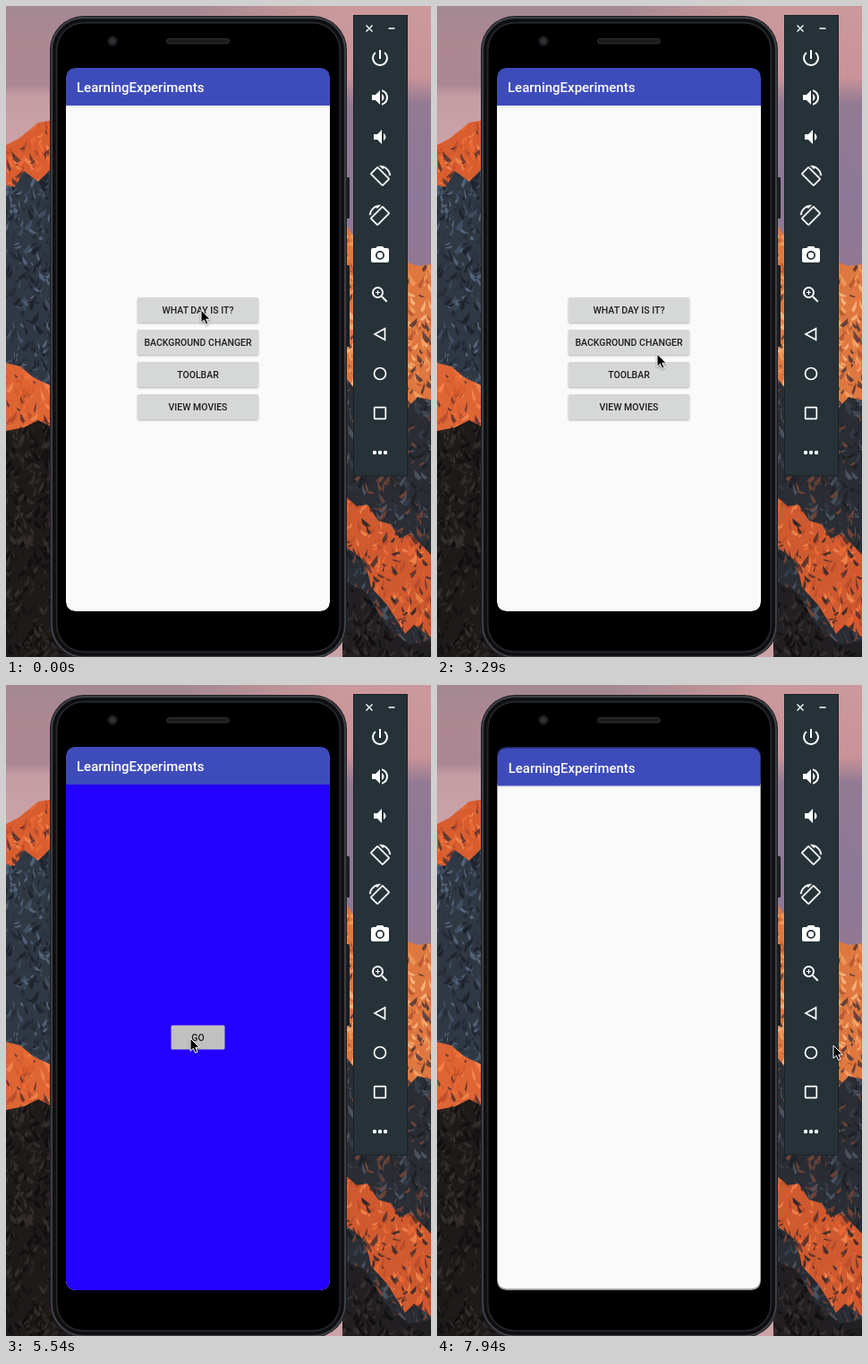
An HTML page for the animation above (8000 ms loop, 475x726 px).

```html
<!DOCTYPE html>
<html lang="en">
<head>
<meta charset="utf-8">
<title>Phone emulator</title>
<style>
html, body { margin: 0; width: 100%; height: 100%; overflow: hidden; background: #000; }
svg { display: block; width: 475px; height: 726px; font-family: Roboto, sans-serif; }
.title { font: 500 15px Roboto, sans-serif; fill: #fff; }
.label { font: 500 10.5px Roboto, sans-serif; fill: #1d1d1d; text-anchor: middle; }
.body { font: 400 19.5px Roboto, sans-serif; fill: #252525; text-anchor: middle; }
.line { fill: none; stroke: #fff; stroke-width: 2; }
.rim { fill: none; }
</style>
</head>
<body>
<svg viewBox="0 0 475 726" xmlns="http://www.w3.org/2000/svg">
  <defs>
    <linearGradient id="sky" x2="0" y2="1">
      <stop offset="0" stop-color="#a48892"/><stop offset=".06" stop-color="#ad8893"/>
      <stop offset=".12" stop-color="#ab8794"/><stop offset=".14" stop-color="#c49da4"/>
      <stop offset=".22" stop-color="#cba3a8"/>
    </linearGradient>
    <linearGradient id="dusk" x2="0" y2="1">
      <stop offset="0" stop-color="#cb999b"/><stop offset=".24" stop-color="#c99399"/>
      <stop offset=".33" stop-color="#937a93"/><stop offset=".65" stop-color="#8c7898"/>
      <stop offset="1" stop-color="#967791"/>
    </linearGradient>
    <linearGradient id="blend" x1="200" x2="375" y1="0" y2="0" gradientUnits="userSpaceOnUse">
      <stop offset="0" stop-color="#cb999b" stop-opacity="0"/><stop offset="1" stop-color="#cb999b"/>
    </linearGradient>
    <filter id="soft" x="-10%" y="-10%" width="120%" height="140%">
      <feDropShadow dx="0" dy="1" stdDeviation=".8" flood-opacity=".3"/>
    </filter>
    <clipPath id="screenClip"><rect x="67" y="69" width="295" height="606" rx="10.500"/></clipPath>
    <clipPath id="pressClip"><rect id="pressBox" x="147" width="135" height="28" rx="1.5"/></clipPath>
  </defs>

  <rect width="475" height="726" fill="url(#sky)"/>
  <path d="M200 0H375V60H200z" fill="url(#blend)"/>
  <path d="M375 0H475V330H375z" fill="url(#dusk)"/>
  <g id="rocks"></g>

  <path d="M380 191h3q1 0 1 2v43q0 1-1 1h-3zM380 289h3q1 0 1 2v88q0 1-1 1h-3z" fill="#1b1d1f"/>
  <rect x="49" y="11" width="332" height="717" rx="38" fill="#1e1f23"/>
  <rect class="rim" x="51" y="13" width="328" height="713" rx="36" stroke="#46484e" stroke-width="1.500"/>
  <rect class="rim" x="54" y="16" width="322" height="707" rx="33" stroke="#0d0e10" stroke-width="3"/>
  <rect x="57" y="19" width="316" height="701" rx="30" fill="#000" stroke="#2c2e33"/>
  <circle cx="119" cy="39" r="5.5" fill="#1f2024"/><circle cx="119" cy="39" r="2.6" fill="#33343b"/>
  <rect x="179.500" y="36.500" width="70" height="5.500" rx="2.700" fill="#1c1c1f" stroke="#303034"/>

  <g clip-path="url(#screenClip)">
    <g id="menu"></g>
    <rect id="dim" x="67" y="69" width="295" height="606"/>
    <g id="top"></g>
  </g>

  <rect x="388.500" y="10.500" width="60" height="513.500" fill="#263238" stroke="#192226"/>
  <g id="tools" fill="#fff"></g>
  <path id="cursor" d="M0 0V14.300L3.300 11.200 5.600 16.300 8 15.200 5.800 10.200H10.300Z" fill="#000" stroke="#fff" stroke-width="1" stroke-linejoin="round" style="filter:drop-shadow(0 1px 1px rgba(0,0,0,.4))"/>
</svg>
<script>
const $ = id => document.getElementById(id);
const set = (el, attrs) => { for (const a in attrs) el.setAttribute(a, attrs[a]); };

// Wallpaper: outlined rock areas strewn with small seeded facets, one path per tone.
let seed = 11;
const rnd = () => (seed = seed * 16807 % 2147483647) / 2147483647;
function rock(path, base, tones, [x0, y0, x1, y1]) {
  const id = `rock${x0}-${y0}`, count = (x1 - x0) * (y1 - y0) / 50 / tones.length;
  let out = `<clipPath id="${id}"><path d="${path}"/></clipPath><path d="${path}" fill="${base}"/><g clip-path="url(#${id})">`;
  for (const tone of tones) {
    let d = '';
    for (let i = 0; i < count; i++) {
      const x = x0 + rnd() * (x1 - x0), y = y0 + rnd() * (y1 - y0);
      const a = (2 + rnd() * 8) * (rnd() < .5 ? -1 : 1), b = 2 + rnd() * 10;
      d += `M${x.toFixed(1)} ${y.toFixed(1)}l${a} ${b}l${-a * .4} ${b * .3}l${-a * .5} ${-b * .5}z`;
    }
    out += `<path d="${d}" fill="${tone}" opacity=".8"/>`;
  }
  return out + '</g>';
}
const fire = ['#b5492a', '#f58a50', '#4a2f2f', '#ee6c36', '#d95a2c'];
const slate = ['#20262f', '#5c6f86', '#2b323d', '#44546a', '#1c2027'];
const coal = ['#302a28', '#0d0c0c', '#393230', '#131111'];
$('rocks').innerHTML =
  rock('M0 155L14 148 24 140 36 130 60 126V220H0z', '#d85e30', fire, [0, 126, 55, 215]) +
  rock('M0 200L10 202 20 184 36 196 60 172V480H0z', '#303844', slate, [0, 172, 55, 440]) +
  rock('M0 398L16 402 30 414 60 428V480L36 464 20 474 0 486z', '#de6534', fire, [0, 396, 55, 484]) +
  rock('M0 474L20 470 36 462 60 474V640L100 726H0z', '#1d1a19', coal, [0, 462, 80, 725]) +
  rock('M376 238L392 262 430 280 449 286 460 290 475 288V480H376z', '#de7840', ['#ffbd88', '#f39a5e', '#b2502f', '#f5a365', '#4a3437'], [376, 238, 475, 465]) +
  rock('M376 410L392 430 449 448 460 436 475 440V726H376z', '#2a2d34', ['#1b1d22', '#525c6a', '#24262c', '#39404b', '#7d4838'], [376, 410, 475, 724]) +
  rock('M376 544L392 558 404 556 416 574 430 578 440 594 452 588 475 612V704L456 690 446 700 426 668 408 648 402 620 376 600z', '#d05a2f', [...fire, '#2a2528'], [376, 544, 475, 704]) +
  rock('M376 640L402 654 424 690 450 712 475 708V726H376z', '#211f22', coal, [376, 645, 475, 725]);

// Emulator tool strip.
const icon = (y, body) => `<g transform="translate(418 ${y})">${body}</g>`;
const glyph = d => `<path transform="translate(-12 -12)" fill-rule="evenodd" d="${d}"/>`;
const speaker = x => `M${x} 9v6h4l5 5V4L${x + 4} 9z`;
const wave = x => `M${x} 7.970v8.050c1.480-.73 2.500-2.250 2.500-4.020s-1.020-3.290-2.500-4.030z`;
const turn = s => `<g transform="scale(${s} 1)" stroke="#fff" stroke-width=".4">` +
  glyph('M16.480 2.520c3.270 1.550 5.610 4.720 5.970 8.480h1.500C23.440 4.840 18.290 0 12 0l-.66.03 3.810 3.810zM10.230 1.750c-.59-.59-1.540-.59-2.120 0L1.750 8.110c-.59.59-.59 1.540 0 2.120l12.020 12.020c.59.59 1.540.59 2.120 0l6.360-6.360c.59-.59.59-1.540 0-2.120zM14.830 21.190L2.810 9.170l6.360-6.360 12.020 12.020z') + '</g>';
$('tools').innerHTML =
  '<path class="line" style="stroke-width:1.400" d="M402.500 21.500l7 7m0-7l-7 7M427.500 25h7"/>' +
  icon(58, '<path class="line" d="M0-9V1M-5.100-6.100A8 8 0 1 0 5.100-6.100"/>') +
  icon(102, glyph(speaker(3) + wave(14) + 'M14 3.230v2.060c2.890.86 5 3.540 5 6.710s-2.110 5.850-5 6.710v2.060c4.010-.91 7-4.490 7-8.770s-2.990-7.860-7-8.770z')) +
  icon(146, glyph(speaker(5) + wave(16))) +
  icon(190, turn(1)) + icon(234, turn(-1)) +
  icon(278, glyph('M9 2L7.170 4H4a2 2 0 0 0-2 2v12a2 2 0 0 0 2 2h16a2 2 0 0 0 2-2V6a2 2 0 0 0-2-2h-3.170L15 2zM12 7a5 5 0 1 1 0 10a5 5 0 1 1 0-10z') + '<circle r="3.200"/>') +
  icon(322, '<circle class="line" cx="-2.500" cy="-2.500" r="5.500"/><path class="line" d="M2 2l5.700 5.700"/><path class="line" style="stroke-width:1.200" d="M-5-2.500h5M-2.500-5v5"/>') +
  icon(366, '<path class="line" style="stroke-width:1.700" d="M5.500-6.300V6.300L-6 0z"/>') +
  icon(410, '<circle class="line" style="stroke-width:1.700" r="6.500"/>') +
  icon(454, '<rect class="line" style="stroke-width:1.700" x="-6.300" y="-6.300" width="12.600" height="12.600" rx=".5"/>') +
  icon(498, '<circle cx="-6" r="2.200"/><circle r="2.200"/><circle cx="6" r="2.200"/>');

// App screens.
const page = (body, id = '') => `<path ${id} d="M67 105H362V664q0 11-11 11H78q-11 0-11-11z" fill="#fafafa"/>` +
  '<path d="M67 111h295v2H67z" opacity=".06"/><path d="M67 111V80q0-11 11-11h273q11 0 11 11v31z" fill="#3e4cbb"/>' +
  '<text class="title" x="79" y="96">LearningExperiments</text>' + body;
const button = (x, y, w, label) => `<rect x="${x}" y="${y}" width="${w}" height="28" rx="1.500" fill="#d6d8d7" filter="url(#soft)"/>` +
  `<text class="label" x="214.500" y="${y + 18}">${label}</text>`;
const rowY = i => 325 + 36 * i;

$('menu').innerHTML = page(
  ['WHAT DAY IS IT?', 'BACKGROUND CHANGER', 'TOOLBAR', 'VIEW MOVIES'].map((s, i) => button(147, rowY(i), 135, s)).join('') +
  '<g id="press" clip-path="url(#pressClip)"><rect x="147" y="325" width="135" height="140" opacity=".06"/><circle id="ripple" opacity=".1"/></g>');
$('top').innerHTML =
  `<g id="day">${page('<text class="body" x="214.500" y="400.500">Current Day of Month:</text><text class="body" x="214.500" y="441.500">13</text>')}</g>` +
  `<g id="go">${page('<clipPath id="goClip"><rect x="184.500" y="379.500" width="60" height="27" rx="1.500"/></clipPath>' +
    '<rect id="goBox" x="184.500" y="379.500" width="60" height="27" rx="1.500"/>' +
    '<circle id="goRipple" cx="214.500" cy="393" opacity=".08" clip-path="url(#goClip)"/>' +
    '<text class="label" x="214.500" y="397">GO</text>', 'id="goPage"')}</g>` +
  `<g id="blank">${page('')}</g>`;

const STEP = 150, LOOP = 8000;
const visits = [
  { id: 'day', row: 0, press: 7, open: 9, close: 19 },
  { id: 'go', row: 1, press: 26, open: 27, close: 46 },
  { id: 'blank', row: 2, press: 51, open: 52, close: 99 }
];
const path = [
  [0, 218, 339], [1, 219, 342], [11, 252, 352], [12, 372, 388], [13, 450, 396], [14, 431, 381],
  [15, 420, 373], [16, 416, 370], [21, 338, 380], [22, 246, 388], [23, 214, 378], [24, 206, 374],
  [29, 205, 390], [30, 206, 394], [38, 222, 394], [39, 296, 394], [40, 362, 394], [41, 394, 383],
  [42, 407, 371], [43, 410, 368], [47, 334, 386], [48, 250, 401], [49, 230, 404],
  [52, 318, 405], [53, 443, 402]
];
const grow = (el, s) => set(el, { transform: `translate(214.500 372) scale(${s}) translate(-214.500 -372)` });

function render(t) {
  const n = Math.floor((t % LOOP + 10) / STEP);
  const [, x, y] = path.filter(p => p[0] <= n).pop();
  set($('cursor'), { transform: `translate(${x} ${y})` });

  const press = visits.find(v => n >= v.press && n <= v.open);
  $('press').style.display = press ? '' : 'none';
  if (press) {
    const at = path.filter(p => p[0] <= press.press).pop();
    set($('pressBox'), { y: rowY(press.row) });
    set($('ripple'), { cx: at[1], cy: rowY(press.row) + 14, r: 22 + 50 * (n - press.press) });
  }

  let scale = 1, alpha = 1, dim = 0;
  for (const v of visits) {
    const on = n >= v.open && n <= v.close;
    $(v.id).style.display = on ? '' : 'none';
    if (!on) continue;
    if (n === v.open) { scale = .94; alpha = .55; }
    if (n === v.open + 1) { scale = .994; dim = .4; }
    if (n === v.close) { scale = .985; alpha = .45; }
  }
  grow($('top'), scale);
  set($('top'), { opacity: alpha });
  set($('dim'), { opacity: dim });

  const blue = n >= 33, held = n >= 30 && n < 33;
  const tone = Math.round(188 + 8 * Math.min(1, Math.max(0, (n - 34) / 6)));
  set($('goPage'), { fill: blue ? '#2300ff' : '#fafafa' });
  set($('goBox'), {
    fill: blue ? `rgb(${tone},${tone},${tone})` : held ? '#c9cbca' : '#d6d8d7',
    filter: blue ? 'none' : 'url(#soft)'
  });
  set($('goRipple'), { r: held ? 17 + 9 * (n - 30) : 0 });
}

const start = performance.now();
function tick() {
  render(performance.now() - start);
  requestAnimationFrame(tick);
}
tick();
</script>
</body>
</html>
```
